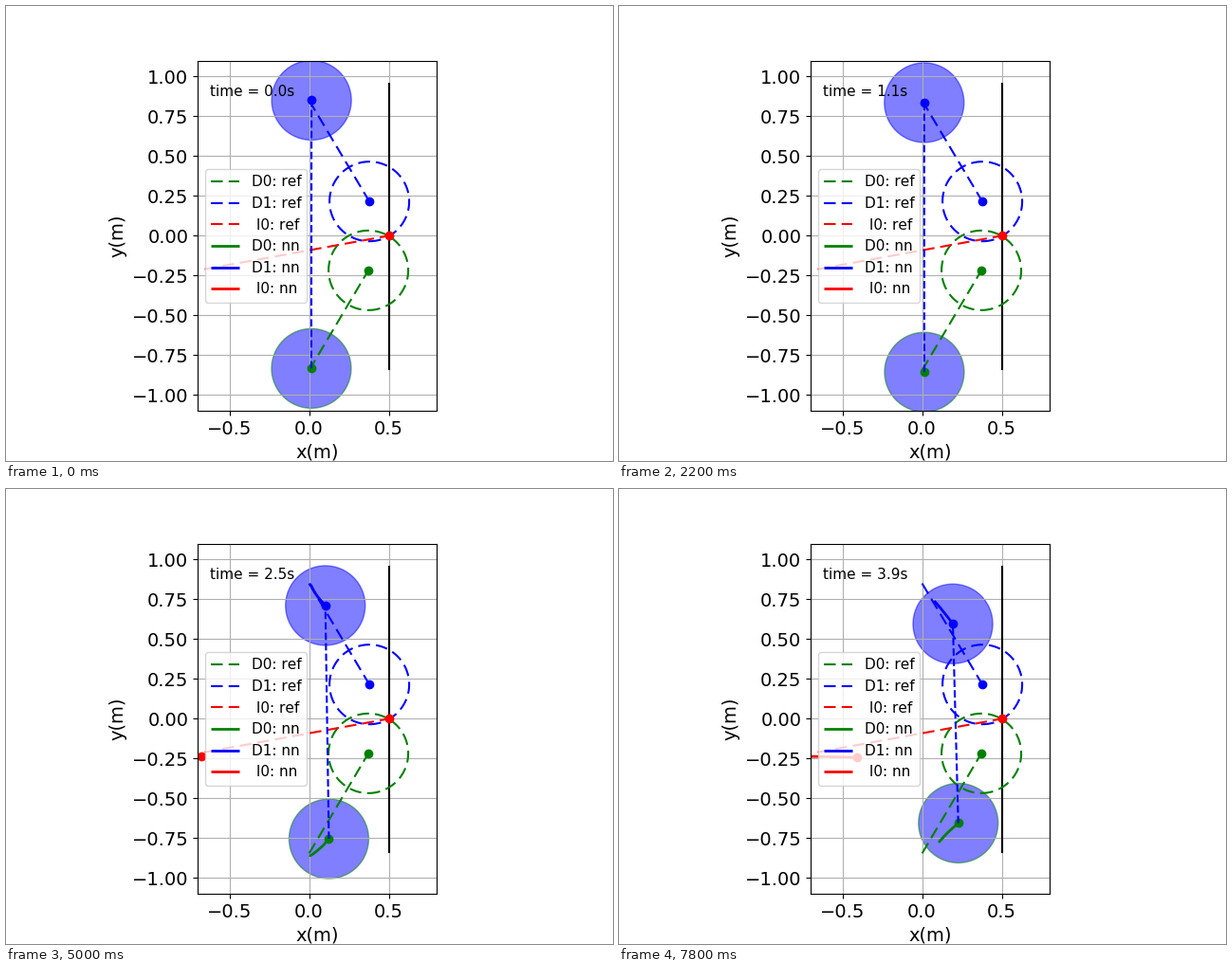
Animation of 640x480 px, one loop 8000 ms. Source, as a matplotlib script:

```python
import numpy as np
import matplotlib.pyplot as plt
from matplotlib.animation import FuncAnimation
from matplotlib.patches import Circle

FRAMES, STEP = 40, 0.1
RADIUS = 0.25
TAIL = 17
DASHES = (6, 3)
COLORS = {"D0": "green", "D1": "blue", "I0": "red"}

# Planned straight paths: start and end
PLANS = {
    "D0": ((0, -.845), (.372, -.217)),
    "D1": ((0, .85), (.378, .2155)),
    "I0": ((-.655, -.21), (.5, 0)),
}

times = np.arange(FRAMES) * STEP
KNOTS = np.array([0, 1.1, 1.9, 2.5, 3.3, 3.9])


def smooth(values):
    """Cubic Hermite curve through the values at the knots."""
    v = np.array(values)
    slope = np.gradient(v, KNOTS)
    k = np.clip(np.searchsorted(KNOTS, times, "right") - 1, 0, len(v) - 2)
    h = KNOTS[k + 1] - KNOTS[k]
    s = (times - KNOTS[k]) / h
    ease = s * s * (3 - 2 * s)
    return (v[k] + ease * (v[k + 1] - v[k])
            + h * s * (1 - s) * ((1 - s) * slope[k] - s * slope[k + 1]))


# Both defenders hover with a slight sway before they set off
sway = -.007 * np.sin(np.pi * np.minimum(times / KNOTS[1], 1))
paths = {
    "D0": (smooth([.014, .014, .082, .124, .168, .227]) + sway,
           smooth([-.833, -.856, -.801, -.754, -.708, -.655])),
    "D1": (smooth([.015, .013, .052, .102, .157, .193]) + sway,
           smooth([.851, .836, .769, .711, .643, .596])),
    "I0": (-1.151 + .19 * times, -.233 - .0006 * times ** 2),
}

plt.rcParams["font.family"] = "DejaVu Sans"
plt.rcParams["text.kerning_factor"] = 6
fig, ax = plt.subplots(figsize=(6.4, 4.8), dpi=100)
ax.set_aspect("equal")
ax.set_xlim(-.7, .8)
ax.set_ylim(-1.1, 1.1)
ax.set_xticks([-.5, 0, .5])
ax.set_yticks(np.arange(-1, 1.01, .25))
ax.tick_params(labelsize=14)
ax.set_xlabel("x(m)", fontsize=14)
ax.set_ylabel("y(m)", fontsize=14)
ax.grid(True)

ax.plot([.5, .5], [-.835, .955], color="black", lw=1.5)

angle = np.linspace(-np.pi / 2, 1.5 * np.pi, 120)
for name in ("D0", "D1"):
    cx, cy = PLANS[name][1]
    ax.plot(cx + RADIUS * np.cos(angle), cy + RADIUS * np.sin(angle),
            color=COLORS[name], lw=1.5, dashes=DASHES)


def label(name, kind):
    return f"{' ' if name == 'I0' else ''}{name}: {kind}"


for name, (start, end) in PLANS.items():
    ax.plot(*zip(start, end), color=COLORS[name], lw=1.5, dashes=DASHES,
            label=label(name, "ref"))
    ax.plot(*end, "o", color=COLORS[name])

tails, dots, discs = {}, {}, {}
for name, color in COLORS.items():
    tails[name], = ax.plot([], [], color=color, lw=2, solid_capstyle="butt",
                           label=label(name, "nn"))
    dots[name], = ax.plot([], [], "o", color=color)
    if name != "I0":
        discs[name] = ax.add_patch(
            Circle((0, 0), RADIUS, fc="blue", ec=color, alpha=.5))

link, = ax.plot([], [], "--", color="blue", lw=1.5)
clock = ax.text(.05, .9, "", transform=ax.transAxes, fontsize=11)
ax.legend(loc="center left", fontsize=11)


def draw(i):
    first = max(0, i - TAIL)
    for name, (x, y) in paths.items():
        tails[name].set_data(x[first:i + 1], y[first:i + 1])
        dots[name].set_data([x[i]], [y[i]])
        if name in discs:
            discs[name].center = x[i], y[i]
    (x0, y0), (x1, y1) = paths["D0"], paths["D1"]
    link.set_data([x0[i], x1[i]], [y0[i], y1[i]])
    clock.set_text(f"time = {times[i]:.1f}s")
    return []


anim = FuncAnimation(fig, draw, frames=FRAMES, interval=1000 * 8 // FRAMES,
                     init_func=lambda: draw(0), repeat=True, repeat_delay=0)
plt.show()
```
